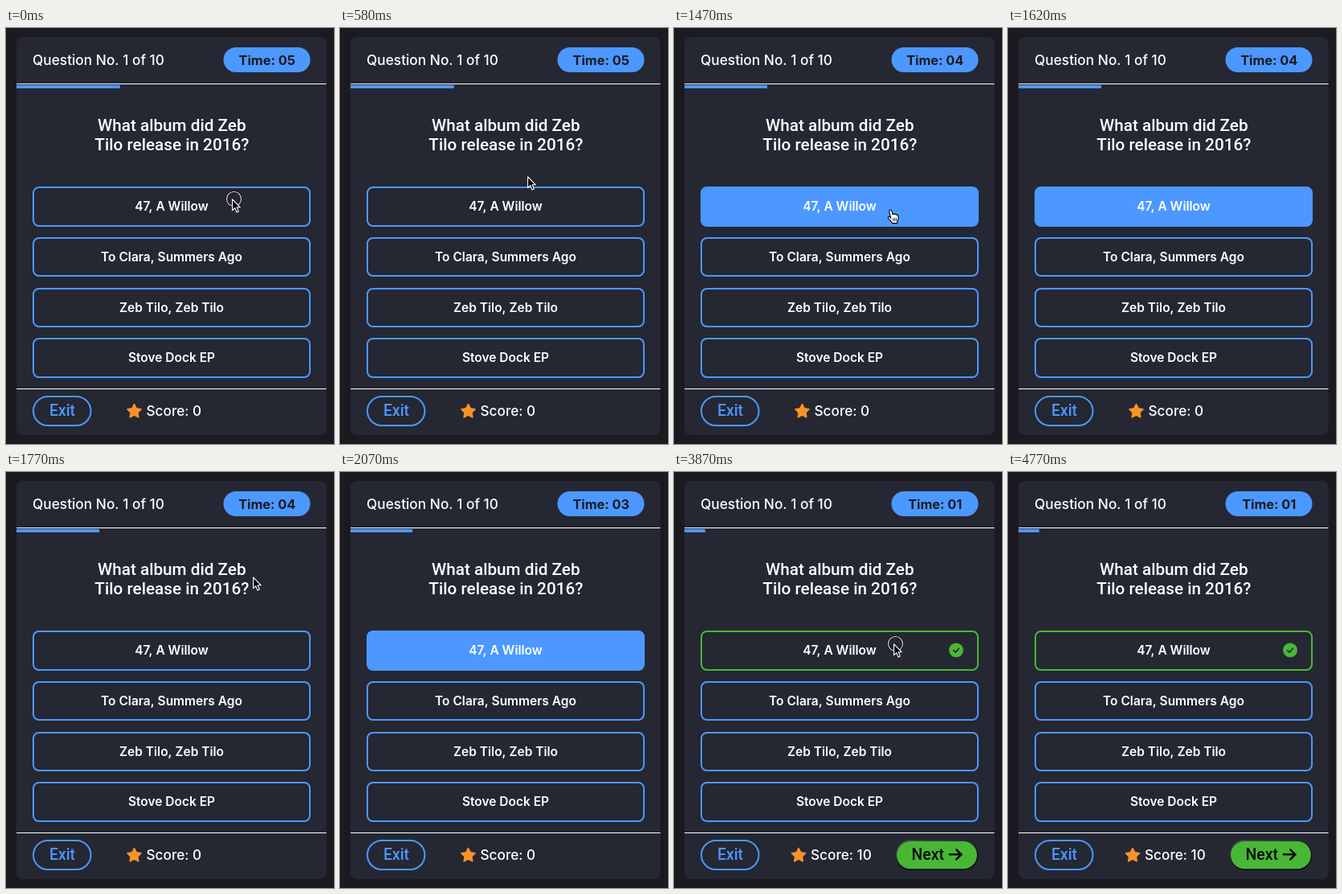
Write an HTML page with a canvas that moves like this. It is 408 px wide and 517 px high and loops after 5.81 s.

```html
<!DOCTYPE html>
<html lang="en">
<head>
<meta charset="utf-8">
<title>Music quiz</title>
<style>
  html, body { margin: 0; width: 100%; height: 100%; overflow: hidden; background: #1c1a21; }
  canvas { display: block; width: 408px; height: 517px; }
</style>
</head>
<body>
<canvas id="stage"></canvas>
<script>
const W = 408, H = 517, LOOP = 5810;
const PAGE = '#1c1a21', CARD = '#252733', BLUE = '#4c98ff', GREEN = '#49b736',
      ORANGE = '#f99327', WHITE = '#fff', INK = '#0b0b0d';
const INTER = 'Inter, sans-serif', ROBOTO = 'Roboto, sans-serif';

const canvas = document.getElementById('stage');
const ctx = canvas.getContext('2d');
const ratio = window.devicePixelRatio || 1;
canvas.width = W * ratio;
canvas.height = H * ratio;

const QUESTION = ['What album did Zeb', 'Tilo release in 2016?'];
const ANSWERS = ['47, A Willow', 'To Clara, Summers Ago', 'Zeb Tilo, Zeb Tilo', 'Stove Dock EP'];

// Each track is a list of [start time, value]; values hold until the next entry.
const SECONDS = [[0, 5], [880, 4], [1920, 3], [2820, 2], [3870, 1]];
const HOVER = [[0, false], [1470, true], [1770, false], [2070, true], [3870, false]];
const POINTER = [
  [0, { shape: 'arrow', x: 281, y: 212, ring: true }],
  [140, { shape: 'arrow', x: 209, y: 225 }],
  [290, { shape: 'arrow', x: 391, y: 87 }],
  [430, { shape: 'arrow', x: 399, y: 39 }],
  [580, { shape: 'arrow', x: 233, y: 184 }],
  [730, { shape: 'arrow', x: 240, y: 215 }],
  [880, { shape: 'arrow', x: 302, y: 203 }],
  [1030, null],
  [1470, { shape: 'hand', x: 265, y: 225 }],
  [1620, null],
  [1770, { shape: 'arrow', x: 307, y: 130 }],
  [1920, { shape: 'arrow', x: 320, y: 67 }],
  [2070, null],
  [2220, { shape: 'hand', x: 269, y: 214 }],
  [3870, { shape: 'arrow', x: 273, y: 213, ring: true }],
  [4020, { shape: 'arrow', x: 273, y: 213 }],
  [4770, null]
];
const ANSWERED_AT = 3870;

const ARROW = new Path2D('M.6 .9V14.6L3.8 11.6L6 17L8.3 16L6.1 10.8H10.3Z');
const HAND = new Path2D('M4.3 9.6L3 4.2Q2.4 1.3 4 1Q5.5 .7 6.1 3.1L7 6.8' +
  'Q8.1 5.4 9.3 6.6Q10.7 5.8 11.5 7.3Q13.4 6.6 14 8.8Q14.6 12 13 14.8L12.7 17.6' +
  'H6.6Q5.6 15.4 1.7 11.9Q.6 10.1 2 9.5Q3.2 9.2 4.9 11.3Z');

function valueAt(track, t) {
  let value;
  for (const [start, v] of track) if (t >= start) value = v;
  return value;
}

function text(str, x, y, font, color = WHITE, align = 'left') {
  ctx.font = font;
  ctx.fillStyle = color;
  ctx.textAlign = align;
  ctx.fillText(str, x, y);
}

function box(x, y, w, h, r, fill, stroke, line = 2) {
  const inset = stroke ? line / 2 : 0;
  ctx.beginPath();
  ctx.roundRect(x + inset, y + inset, w - inset * 2, h - inset * 2, r - inset);
  if (fill) { ctx.fillStyle = fill; ctx.fill(); }
  if (stroke) { ctx.strokeStyle = stroke; ctx.lineWidth = line; ctx.stroke(); }
}

function rect(x, y, w, h, color) {
  ctx.fillStyle = color;
  ctx.fillRect(x, y, w, h);
}

function polyline(points, color, width) {
  ctx.beginPath();
  points.forEach(([x, y]) => ctx.lineTo(x, y));
  ctx.strokeStyle = color;
  ctx.lineWidth = width;
  ctx.stroke();
}

function disc(x, y, r, color) {
  ctx.beginPath();
  ctx.arc(x, y, r, 0, Math.PI * 2);
  ctx.fillStyle = color;
  ctx.fill();
}

function star(x, y) {
  ctx.beginPath();
  for (let i = 0; i < 10; i++) {
    const r = i % 2 ? 4.6 : 9, a = i * Math.PI / 5 - Math.PI / 2;
    ctx.lineTo(x + r * Math.cos(a), y + r * Math.sin(a));
  }
  ctx.closePath();
  ctx.fillStyle = ctx.strokeStyle = ORANGE;
  ctx.lineWidth = 1.6;
  ctx.fill();
  ctx.stroke();
}

function header(seconds) {
  text('Question No. 1 of 10', 33, 46, `500 17.3px ${INTER}`);
  box(270.5, 24, 108, 31, 15.5, BLUE);
  text(`Time: 0${seconds}`, 324.7, 46, `700 16.3px ${INTER}`, PAGE, 'center');
  rect(13, 69, 385.5, 1, WHITE);
  rect(13, 71, 25.75 * seconds, 4, BLUE);
}

function answers(hover, answered) {
  ANSWERS.forEach((label, i) => {
    const y = 197.2 + i * 62.75, first = i === 0;
    const top = Math.round(y), bottom = Math.round(y + 49.5);
    const edge = first && answered ? GREEN : BLUE;
    box(33, top, 346, bottom - top, 8, first && hover ? BLUE : null, edge);
    text(label, 206, y + 29.8, `600 15.5px ${INTER}`, WHITE, 'center');
  });
  if (answered) {
    disc(351, 221.4, 8.9, GREEN);
    polyline([[347.6, 221.7], [350.1, 224.1], [354.5, 219.3]], CARD, 1.6);
  }
}

function footer(answered) {
  rect(13, 448, 385.5, 1, WHITE);
  box(33, 457, 73.5, 38, 19, null, BLUE);
  text('Exit', 70, 482.2, `500 19.3px ${ROBOTO}`, BLUE, 'center');
  star(answered ? 155 : 159.5, 476.5);
  text(`Score: ${answered ? 10 : 0}`, answered ? 170 : 174.5, 482, `500 17.2px ${INTER}`);
  if (!answered) return;
  const edge = ctx.createLinearGradient(276, 457, 284, 495);
  edge.addColorStop(0, '#4d534f');
  edge.addColorStop(1, '#0c120d');
  box(275.5, 457.3, 103, 37.6, 18.8, GREEN, edge, 1.6);
  text('Next', 295.5, 482.2, `500 19.4px ${ROBOTO}`, INK);
  polyline([[343, 475.3], [357.3, 475.3]], INK, 2.6);
  polyline([[351.3, 469.3], [357.3, 475.3], [351.3, 481.3]], INK, 2.6);
}

function pointer(p) {
  if (!p) return;
  ctx.save();
  ctx.translate(p.x, p.y);
  if (p.ring) {
    ctx.beginPath();
    ctx.arc(2.5, .5, 9, 0, Math.PI * 2);
    ctx.strokeStyle = '#08080a';
    ctx.lineWidth = 2.4;
    ctx.stroke();
    ctx.strokeStyle = '#e8e8ea';
    ctx.lineWidth = 1.1;
    ctx.stroke();
  }
  const arrow = p.shape === 'arrow', path = arrow ? ARROW : HAND;
  ctx.fillStyle = arrow ? '#000' : WHITE;
  ctx.strokeStyle = arrow ? WHITE : '#000';
  ctx.lineWidth = 1.1;
  ctx.fill(path);
  ctx.stroke(path);
  if (!arrow) {
    for (const x of [7.6, 9.5, 11.4]) polyline([[x, 11.2], [x, 14.8]], '#000', .8);
  }
  ctx.restore();
}

function draw(t) {
  const answered = t >= ANSWERED_AT;
  ctx.setTransform(ratio, 0, 0, ratio, 0, 0);
  ctx.lineJoin = ctx.lineCap = 'round';
  rect(0, 0, W, H, PAGE);
  box(13, 11, 385.5, 495, 8, CARD);
  header(valueAt(SECONDS, t));
  QUESTION.forEach((line, i) =>
    text(line, 206.3, 128 + i * 24.3, `500 20.7px ${ROBOTO}`, WHITE, 'center'));
  answers(valueAt(HOVER, t), answered);
  footer(answered);
  pointer(valueAt(POINTER, t));
}

function tick() {
  draw(performance.now() % LOOP);
  requestAnimationFrame(tick);
}
tick();
</script>
</body>
</html>
```
